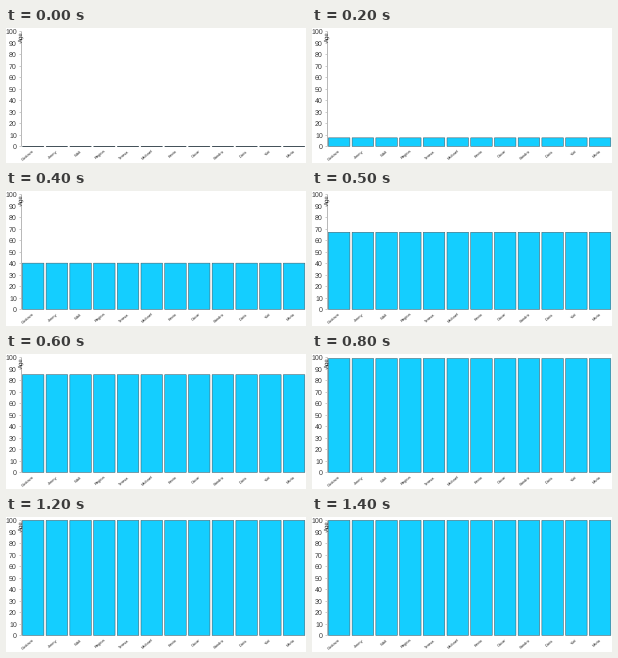
These frames come from a looping animation (300 by 135 pixels, 1.5 s). A matplotlib script:

```python
import matplotlib.pyplot as plt
from matplotlib.animation import FuncAnimation
from matplotlib.patches import Rectangle

DPI = 100
W, H = 300, 135
FRAMES, STEP = 15, 100
BASE, TOP = 118.4, 3.4
LEFT, PITCH, BAR_W = 16.4, 23.72, 21.5
NAMES = ["Gustavo", "Jimmy", "Walt", "Regina", "Teresa", "Michael",
         "Kevin", "Oscar", "Sandro", "Doris", "Yuri", "Mario"]

plt.rcParams["font.family"] = "Liberation Sans"
plt.rcParams["text.hinting"] = "none"
plt.rcParams["text.hinting_factor"] = 1


def pt(px):
    return px * 72 / DPI


fig = plt.figure(figsize=(W / DPI, H / DPI), dpi=DPI, facecolor="white")
ax = fig.add_axes([0, 0, 1, 1])
ax.set_xlim(0, W)
ax.set_ylim(H, 0)
ax.axis("off")


def line(xs, ys, color):
    ax.plot(xs, ys, color=color, lw=pt(0.8), solid_capstyle="butt", zorder=1)


def label(x, y, text, size, **kw):
    ax.text(x, y, text, fontsize=pt(size), zorder=1, **kw)


# Value axis
line([14.5, 14.5], [TOP, BASE], "#a8a8a8")
for value in range(0, 101, 10):
    y = BASE + (TOP - BASE) * value / 100
    line([12.8, 14.5], [y, y], "#c0c0c0")
    label(10.9, y, str(value), 6.6, color="#333333",
          ha="right", va="center_baseline")
label(17.5, TOP, "Age", 6.2, color="#333333", rotation=90,
      ha="right", va="top")

# Bars and their names
bars = []
for i, name in enumerate(NAMES):
    x = LEFT + i * PITCH
    bar = Rectangle((x, BASE), BAR_W, 0, facecolor="#14ceff",
                    edgecolor="#45525a", lw=pt(0.5), joinstyle="miter",
                    snap=False, zorder=3)
    bars.append(ax.add_patch(bar))
    label(x + BAR_W / 2 + 2, 121.3, name, 4.3, color="#222222", rotation=40,
          ha="right", va="top")


def ease(t):
    """Cubic in-out."""
    t = min(max(t, 0), 1)
    return 4 * t ** 3 if t < 0.5 else 1 - 4 * (1 - t) ** 3


def draw(frame):
    height = (BASE - TOP) * ease((frame * STEP + 65) / 1000)
    for bar in bars:
        bar.set_y(BASE - height)
        bar.set_height(height)
    return bars


anim = FuncAnimation(fig, draw, frames=FRAMES, interval=STEP,
                     repeat=True, repeat_delay=0)
plt.show()
```
